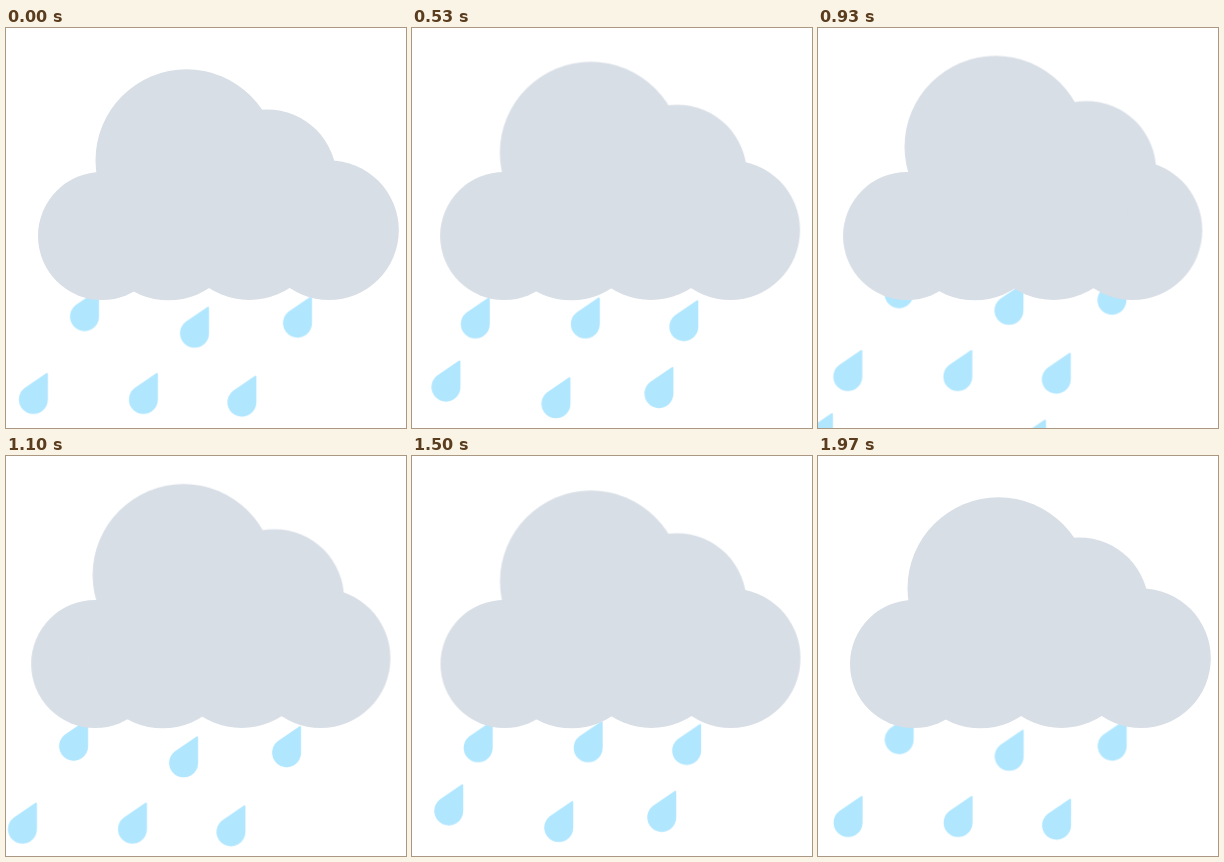
An HTML page that plays this animation: 400x400 px, repeating every 2010 ms.

```html
<!DOCTYPE html>
<html lang="en">
<head>
<meta charset="utf-8">
<title>Rain cloud</title>
<style>
  html, body { margin: 0; width: 100%; height: 100%; overflow: hidden; background: #fff; }
  svg { display: block; width: 100%; height: 100%; }
  #rain { fill: #b0e6fe; }
  #cloud { fill: #d8dee6; }
</style>
</head>
<body>
<svg viewBox="0 0 400 400">
  <defs>
    <path id="drop" d="M14.5 -25.5V0A14.5 14.5 0 1 1 -9 -11.4L12.6 -26.2Q14.5 -27.3 14.5 -25.5Z"/>
  </defs>
  <g id="rain"></g>
  <g id="cloud"></g>
</svg>
<script>
  const LOOP = 2010, STEPS = 60, STEP = LOOP / STEPS, LEAD = 11;
  const SINE = 'cubic-bezier(.37, 0, .63, 1)';
  const rain = document.getElementById('rain');
  const cloud = document.getElementById('cloud');

  function add(parent, tag, attrs = {}) {
    const el = document.createElementNS('http://www.w3.org/2000/svg', tag);
    for (const key in attrs) el.setAttribute(key, attrs[key]);
    return parent.appendChild(el);
  }

  const shift = (x, y) => `translate(${x}px, ${y}px)`;

  function loop(el, frames, offset = 0) {
    el.animate(frames, {
      duration: LOOP,
      iterations: Infinity,
      delay: -LEAD - offset * STEP,
      easing: `steps(${STEPS})`
    });
  }

  // Sway to (dx, dy) and back
  function sway(el, dx, dy) {
    loop(el, [
      { transform: shift(0, 0), easing: SINE },
      { transform: shift(dx, dy), easing: SINE },
      { transform: shift(0, 0) }
    ]);
  }

  // cx, cy, r, dx, dy
  const puffs = [
    [180.5, 132.3, 91, -3, -13.6],
    [261.2, 151, 69.5, 7.5, -8.5],
    [96, 208, 64, -7, 0],
    [323, 202.2, 69.8, -8.6, 0],
    [162.5, 198.3, 74, -6, 0],
    [243.3, 198, 74, -8, 0]
  ];
  for (const [cx, cy, r, dx, dy] of puffs) {
    sway(add(cloud, 'circle', { cx, cy, r }), dx, dy);
  }

  // Each row starts hidden behind the cloud and falls past the bottom edge
  const rows = [
    { x: 110.7, y: 230.2, drops: [[0, 0], [110, 16.7], [213, 6.5]], offset: 12 },
    { x: 105.2, y: 230.4, drops: [[0, 0], [110, 0], [208.5, 2.7]], offset: 29 }
  ];
  for (const { x, y, drops, offset } of rows) {
    for (const half of [0, STEPS / 2]) {
      const row = add(rain, 'g');
      for (const [dx, dy] of drops) {
        add(row, 'use', { href: '#drop', x: x + dx, y: y + dy });
      }
      loop(row, [
        { transform: shift(0, 0) },
        { transform: shift(-161, 292) }
      ], offset + half);
    }
  }
  sway(rain, -3, -13.3);
</script>
</body>
</html>
```
